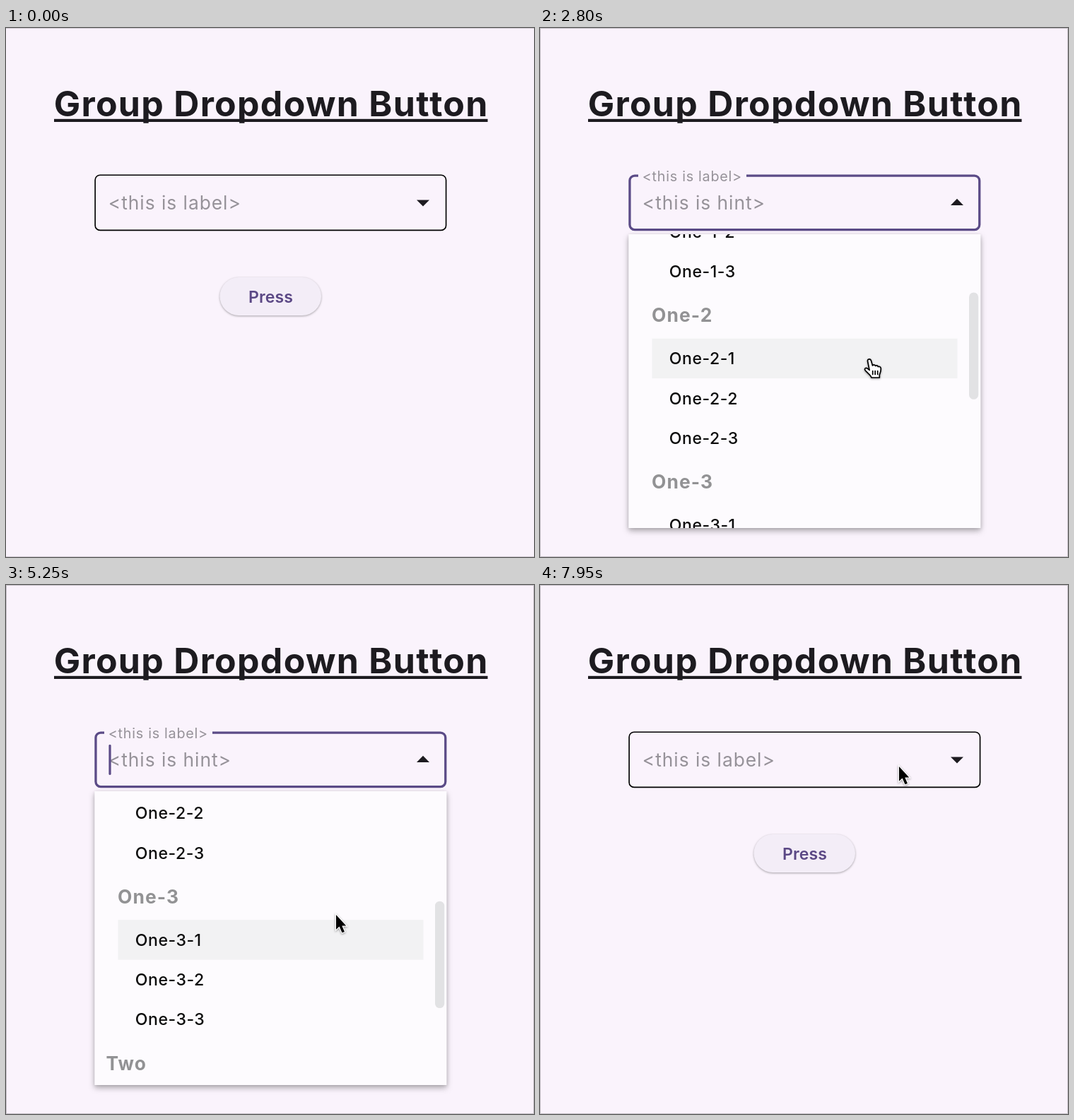
These frames come from a looping animation (747 by 749 pixels, 8 s). An HTML page:

```html
<!DOCTYPE html>
<html lang="en">
<head>
<meta charset="utf-8">
<title>Group Dropdown Button</title>
<style>
  html, body { margin: 0; width: 100%; height: 100%; overflow: hidden; background: #faf3fc; }
  svg { display: block; width: 100%; height: 100%; }
  text { font: 26.4px Inter, Roboto, sans-serif; letter-spacing: .95px; white-space: pre; }
  .title { font-size: 50px; font-weight: 700; letter-spacing: 1.3px; text-anchor: middle; fill: #1d1b20; }
  .press { font-size: 23.1px; font-weight: 600; letter-spacing: .1px; text-anchor: middle; fill: #5b4885; }
  .soft { fill: #969299; }
  .head { font-weight: 750; letter-spacing: 1.1px; fill: #929294; }
  .item { font-size: 23.1px; font-weight: 450; letter-spacing: .5px; fill: #0c0c0c; }
  #button { filter: drop-shadow(0 1.5px 1.5px #0005); }
  #panel { filter: drop-shadow(0 4px 4px #0004) drop-shadow(0 1px 2px #0002); }
  #cursor { filter: drop-shadow(0 1.5px 1.5px #0006); }
</style>
</head>
<body>
<svg viewBox="0 0 747 749">
  <defs><clipPath id="view"><rect x="125.3" y="292" width="498.1" height="416"/></clipPath></defs>
  <rect width="747" height="749" fill="#faf3fc"/>
  <path d="M0 .5H747M0 748.5H747" stroke="#d2ccd5"/>
  <path id="frame" d="M.5 0V749M746.5 0V749M0 .5H747M0 748.5H747" stroke="#c4bfc7"/>

  <rect x="68" y="128.8" width="613.5" height="4.2" fill="#1d1b20"/>
  <text class="title" x="375.2" y="125.3">Group Dropdown Button</text>

  <rect id="button" x="302.5" y="353" width="143.5" height="54" rx="27" fill="#f3edf7"/>
  <text class="press" x="374.5" y="388.8">Press</text>

  <path id="outline" fill="none"/>
  <text id="label" class="soft">&lt;this is label&gt;</text>
  <text id="hint" class="soft" x="144.8" y="257.3">&lt;this is hint&gt;</text>
  <rect id="caret" x="145.4" y="226" width="3.2" height="43" rx="1.4" fill="#5b4b87"/>
  <path id="arrow" fill="#1d1b20"/>

  <g id="menu">
    <rect id="panel" x="125.3" y="292" width="498.1" height="416" fill="#fdfbfe"/>
    <g clip-path="url(#view)">
      <g id="list"><rect id="hover" height="56.4" fill="#f2f2f3"/></g>
      <rect id="thumb" x="607" width="13.2" rx="6.6" fill="#e2e2e4"/>
    </g>
  </g>

  <g id="cursor">
    <path id="pointer" transform="scale(.92)" d="M0 0V22.5L5 18L9.2 27.5L13 26L9 16.8H15.5Z"
      fill="#000" stroke="#fff" stroke-width="2.6" paint-order="stroke"/>
    <g id="hand" transform="translate(-9.5 0)" fill="#fff" stroke="#000" stroke-width="1.7"
      stroke-linejoin="round" stroke-linecap="round">
      <path d="M6 4.5C5.6 1.4 9.8 .8 10.8 3.6L13 11C13.5 9.5 16.5 9.5 17 11.5C17.8 10.3 20.4 10.8 20.8 12.6
        C22 11.8 24.5 12.6 24.8 15C25 19 24 21 22.8 24V28H11.5C11 25 6 21.5 2.8 18C.8 15.4 3.4 13.4 5.8 15.2L8.6 17.4Z"/>
      <path d="M13.2 18.5V23.5M16.7 18.5V23.5M20.2 18.5V23.5"/>
    </g>
  </g>
</svg>
<script>
const LOOP = 8000, OPEN = 1150, CLOSE = 7050, HOVER_LAG = 60;
const TOP = 292, VIEW = 416, HEAD = 66.5, ITEM = 56.4;
const $ = id => document.getElementById(id);
const set = (id, attrs) => { for (const key in attrs) $(id).setAttribute(key, attrs[key]); };
const clamp = v => Math.min(1, Math.max(0, v));
const mix = (a, b, k) => a + (b - a) * k;
const smooth = k => k * k * (3 - 2 * k);

// Each step: time, then values.
const SCROLL = [[1950, 0], [2000, 5], [2400, 102], [2800, 226], [3950, 581.5], [4640, 727],
  [4880, 727], [5000, 640], [5250, 428], [5750, 190], [6400, 0]];
const CURSOR = [[350, 596, 664], [550, 572, 364], [750, 572, 364], [1000, 545, 256], [1250, 545, 256],
  [1750, 467, 467], [6480, 467, 467], [6600, 631, 420], [6850, 681, 392], [7050, 681, 392],
  [7200, 700, 384], [7500, 660, 360], [7800, 537, 296], [7950, 508, 257]];

function track(steps, t, ease = k => k) {
  const i = steps.findIndex(s => s[0] > t);
  if (i === 0) return steps[0].slice(1);
  if (i < 0) return steps[steps.length - 1].slice(1);
  const [a, b] = [steps[i - 1], steps[i]];
  const k = ease((t - a[0]) / (b[0] - a[0]));
  return a.slice(1).map((v, n) => mix(v, b[n + 1], k));
}

const items = [];
let end = TOP + 5.3;

function addText(name, kind, x, y) {
  const node = document.createElementNS('http://www.w3.org/2000/svg', 'text');
  node.textContent = name;
  node.setAttribute('class', kind);
  node.setAttribute('x', x);
  node.setAttribute('y', y);
  $('list').append(node);
}
function addHead(name, depth) {
  addText(name, 'head', 125 + 16.5 * (depth + 1), end + HEAD / 2 + 10);
  end += HEAD;
}
function addItem(name, depth) {
  const inset = 16.5 * depth;
  addText(name, 'item', 125 + inset + 24.8, end + ITEM / 2 + 8.3);
  items.push({ y: end, x: 125.5 + inset, width: 498 - 2 * inset });
  end += ITEM;
}

addHead('One', 0);
for (const group of ['One-1', 'One-2', 'One-3']) {
  addHead(group, 1);
  for (let n = 1; n <= 3; n++) addItem(`${group}-${n}`, 2);
}
addHead('Two', 0);
for (let n = 1; n <= 3; n++) addItem(`Two-${n}`, 1);
addHead('Three', 0);
addItem('Three-1', 1);
const content = end + 5.3 - TOP;

function itemAt(t) {
  const [x, y] = track(CURSOR, t, smooth);
  const at = y + track(SCROLL, t)[0];
  return y > TOP && items.find(i => at >= i.y && at < i.y + ITEM && x > i.x && x < i.x + i.width);
}

function drawField(t) {
  const k = smooth(clamp((t - OPEN) / 170) - clamp((t - CLOSE) / 170));
  const w = mix(1.65, 3.3, k), c = 7;
  const l = 125.3 + w / 2, r = 623.4 - w / 2, u = 207.4 + w / 2, d = 287.2 - w / 2;
  const corner = (x, y) => `A${c} ${c} 0 0 1 ${x} ${y}`;
  set('outline', {
    d: `M${mix(139, 292, k)} ${u}H${r - c}${corner(r, u + c)}V${d - c}${corner(r - c, d)}` +
       `H${l + c}${corner(l, d - c)}V${u + c}${corner(l + c, u)}H139`,
    stroke: `rgb(${91 * k} ${75 * k} ${135 * k})`,
    'stroke-width': w
  });
  set('label', { transform: `translate(144.8 ${mix(257.3, 217, k)}) scale(${mix(1, .75, k)})` });
  set('hint', { opacity: k });
  const open = t >= OPEN && t < CLOSE;
  const blink = t % 1000;
  set('caret', { opacity: open && blink >= 150 && blink < 650 ? 1 : 0 });
  set('arrow', { d: open ? 'M581 251H599L590 241.8Z' : 'M581 243.4H599L590 252.6Z' });
}

function drawMenu(t) {
  set('menu', { opacity: clamp((t - OPEN) / 100) - clamp((t - CLOSE) / 100) });
  const [scroll] = track(SCROLL, t);
  set('list', { transform: `translate(0 ${-scroll})` });
  const { x, y, width } = itemAt(t - HOVER_LAG) || { x: 0, y: 0, width: 0 };
  set('hover', { x, y, width });
  set('thumb', {
    y: TOP + scroll * VIEW / content,
    height: VIEW * VIEW / content,
    opacity: clamp((t - 2000) / 150)
  });
}

function drawCursor(t) {
  const [x, y] = track(CURSOR, t, smooth);
  const hand = t > 2050 && t < CLOSE && itemAt(t);
  set('cursor', { transform: `translate(${x} ${y})`, opacity: t < 350 ? 0 : 1 });
  set('pointer', { opacity: hand ? 0 : 1 });
  set('hand', { opacity: hand ? 1 : 0 });
}

const start = performance.now();
function draw(now) {
  const t = Math.max(0, now - start) % LOOP;
  set('frame', { opacity: t < 750 ? 0 : 1 });
  drawField(t);
  drawMenu(t);
  drawCursor(t);
  requestAnimationFrame(draw);
}
draw(start);
</script>
</body>
</html>
```
